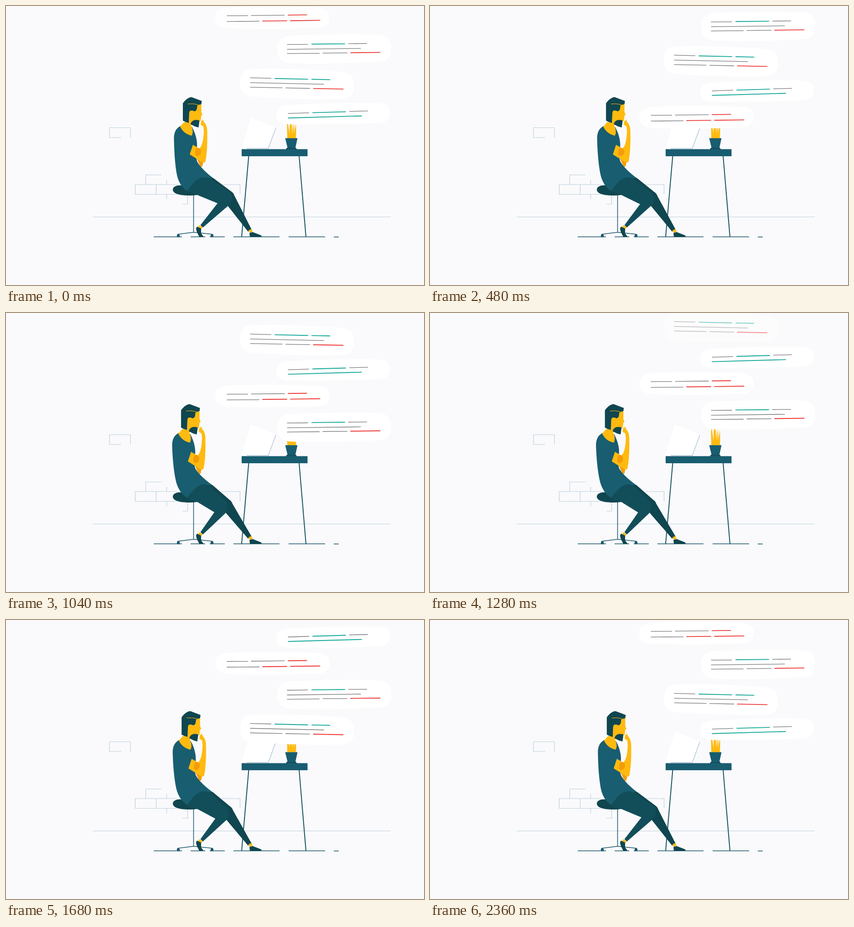
Animation of 917x611 px, one loop 2400 ms. Source, as an HTML page:

```html
<!DOCTYPE html>
<html lang="en">
<head>
<meta charset="utf-8">
<title>Thinking at the desk</title>
<style>
  html, body { margin: 0; width: 100%; height: 100%; overflow: hidden; background: #fafafc; }
  svg { display: block; width: 100%; height: 100%; }
  .wall, .floor, .ink { fill: none; }
  .wall { stroke: #bccfdb; stroke-width: 1.2; }
  .floor { stroke: #1a566a; stroke-width: 1.5; }
  .ink { stroke-linecap: round; }
  .shirt { fill: #195d70; }
  .dark { fill: #10464f; }
  .thigh { fill: #124e5a; }
  .skin { fill: #ffba10; }
  .shade { fill: #f39c0a; }
  .bubble { fill: #fff; }
  .grey { stroke: #77777b; stroke-width: 1.3; }
  .teal { stroke: #16a899; stroke-width: 1.9; }
  .red { stroke: #ec3a38; stroke-width: 1.9; }
</style>
</head>
<body>
<svg viewBox="0 0 917 611">
  <!-- room -->
  <path class="wall" d="M190 462H844M253 288H227V266.500H273V288M341 370H306.500V391M376 391H283.500V412.500H376M329.500 391V412M352.500 381V391M352.500 413V423M398.500 414V434H387M472 391H513.500V412"/>
  <path class="floor" d="M324 505.500H386M405 505.500H437M447 505.500H480M499 505.500H600M620 505.500H700M719 505.700H730"/>

  <!-- chair -->
  <path class="floor" d="M411.500 414V496M376 500L411.500 495.500L454 500"/>
  <g fill="#1a566a"><circle cx="378" cy="503.300" r="3.200"/><circle cx="452" cy="503.300" r="3.200"/></g>
  <path class="dark" d="M366 402C366 394 378 391 392 393L421 413.500C398 417 366 415 366 402Z"/>

  <!-- desk -->
  <path fill="#fff" d="M537 244L592 267L575 312H517Z"/>
  <path fill="none" stroke="#c3d3e0" stroke-width="2" d="M592 267L575.500 312H528"/>
  <path class="skin" d="M617 291L616.500 260L618 252L622 280L622.500 258L624 254L625 247L627 260L628 280L629.500 262L630.500 254L632 280L634 255L635 272L637 256L636 291Z"/>
  <path class="shirt" d="M612.500 289.500H639.500L635 310L638 314H614L617.500 310Z"/>
  <path fill="#154f60" d="M616 310.500H636L638 314H614Z"/>
  <path fill="none" stroke="#175363" stroke-width="2" d="M532.500 328L517 505M643 328L658 505"/>
  <path class="shirt" d="M517 313.500H661.500V329H517Z"/>

  <!-- person -->
  <path class="shade" id="elbow"/>
  <path class="shirt" id="shirt"/>
  <path class="dark" id="farLeg"/>
  <path class="thigh" id="nearLeg"/>
  <path class="skin" d="M423 480L431 484L429 488.500L422 485.500ZM532 491L538.500 488.500L541 494L535 497Z"/>
  <path class="dark" d="M419 483L428 487.500L428 498L433 504.500L431 506H424C422 500 417 494 417 487ZM534 497L541 495L559 502C562 504 561 506 557 506H535Z"/>
  <g id="top">
    <path class="skin" d="M402 229L410 226L419 215L428.500 213L428.500 232L431 238.500L428.500 240L427 252H412L406 262C411 272 410 279 407.500 284C397 282 387 275 382 264L391 254L401 255Z"/>
    <path class="dark" d="M388 213C393 206 400 200 407 199.500L429.500 208L428.500 215L420 217L418.500 226C416 232 412 231 410 229L404 229L402 233L401 256L394 254L388 251Z"/>
    <path fill="none" stroke="#ffba10" stroke-width="1" d="M399 214.500Q410 213 421 216"/>
    <path class="dark" d="M405 259C406 252 414 247 424.500 251L422.500 266L415 264Z"/>
    <path class="skin" d="M429.500 243L435 255C440 260 442 268 441.500 280C442 310 440 330 437 342L432 343L403 325L410 304L424 312C430 308 433 295 434 275L433 264L427 260L428 252L432 250Z"/>
    <path class="shade" d="M417 313C421 309 428 311 428 319C428 327 420 331 416 327C414 322 415 316 417 313Z"/>
  </g>

  <!-- messages -->
  <g class="msg">
    <path class="bubble" d="M485 3C540 0 640 1 684 3C701 4 710 12 709.500 25C709 42 700 47 684 48C610 51 540 51 488 49C470 48 459 40 459 27C459 12 468 5 485 3Z"/>
    <path class="ink grey" d="M485 21.500L530.500 21.300M538 21L611 20.200M485 34L555.500 33.500"/>
    <path class="ink red" d="M619 20L659.500 19.500M563 33L616 32.500M624 32.300L688.500 31.500"/>
  </g>
  <g class="msg">
    <path class="bubble" d="M621 65C690 62 770 61 818 63C836 64 845 75 845 92C845 111 838 121 820 122C750 126 680 128 622 125C603 123 595 112 595 95C595 77 603 67 621 65Z"/>
    <path class="ink grey" d="M617 84.500L662 84.200M751.500 82.700L791.500 82.300M617 95L778 93M617 104.300L687.500 103.700M695 103.200L748.500 102.800"/>
    <path class="ink teal" d="M671 83.600L743 83"/>
    <path class="ink red" d="M756 102.500L820.500 101.700"/>
  </g>
  <g class="msg">
    <path class="bubble" d="M540 138C600 136 680 139 737 144C756 146 764 157 763.500 174C763 194 755 203 737 203.500C670 205 600 203 538 198C521 196 513 185 514 167C515 148 522 139 540 138Z"/>
    <path class="ink grey" d="M536 157.300L581.500 158.500M536 168L697 171.500M536 178L606 179.300M613.500 179.500L666.500 180.600"/>
    <path class="ink teal" d="M590 158.800L662 160.500M671 160.600L710.500 161.500"/>
    <path class="ink red" d="M674.500 180.700L739.500 182"/>
  </g>
  <g class="msg">
    <path class="bubble" d="M620 217C690 213 770 211 817 213C834 214 843 221 842.500 235C842 249 834 255 817 256C750 259 680 260 619 259C602 258 593 251 593 239C593 225 602 218 620 217Z"/>
    <path class="ink grey" d="M619 235.500L664.500 234M753.500 231L793.500 230"/>
    <path class="ink teal" d="M673 233.700L745 231.700M619.500 245.300L780 240.800"/>
  </g>
</svg>
<script>
const LOOP = 2400, SPAN = 267.5;
const $ = id => document.getElementById(id);
const clamp = v => Math.max(0, Math.min(1, v));

// scroll distance over time, one leg per message
const SCROLL = [[0, 0], [611, 63], [1265, 136.3], [1790, 214.5], [LOOP, SPAN]];
// when each message has faded out, and when it starts to come back
const GONE = [115, 715, 1340, 1880];
const BACK = [240, 840, 1440, 2060];
const FADE = 115;
const msgs = document.querySelectorAll('.msg');

function scrolled(t) {
  const i = SCROLL.findIndex(([end]) => t < end);
  const [t0, y0] = SCROLL[i - 1], [t1, y1] = SCROLL[i];
  return y0 + (y1 - y0) * (t - t0) / (t1 - t0);
}

function drawMessages(t) {
  const y = scrolled(t);
  msgs.forEach((m, i) => {
    const left = t >= GONE[i];
    m.setAttribute('transform', `translate(0 ${(left ? SPAN : 0) - y})`);
    m.setAttribute('opacity', clamp((left ? t - BACK[i] : GONE[i] - t) / FADE));
  });
}

function drawPerson(lean) {
  // pt: a point and how far it travels at full lean
  const pt = (x, y, dx = 0, dy = 0) => `${x + dx * lean} ${y + dy * lean} `;
  const up = (x, y) => pt(x, y, -4.6);

  $('top').setAttribute('transform', `translate(${-4.6 * lean} 0)`);
  $('elbow').setAttribute('d', `M${up(418, 333)}L${up(433, 341)}L${up(431, 351)}L${up(427, 353)}Z`);
  $('shirt').setAttribute('d',
    `M${up(382, 263)}C${up(372, 269)}${up(368, 278)}${up(368.5, 292)}` +
    `C${pt(369, 320, -4.2)}${pt(371, 350, -3)}${pt(375, 370, -2)}` +
    `C${pt(378, 385, -1)}${pt(386, 398)}${pt(397, 405)}L${pt(425, 392)}L${pt(456, 378, -2)}` +
    `C${pt(441, 367, -3)}${pt(426, 353, -4)}${up(419, 340)}` +
    `C${up(415, 325)}${up(420, 315)}${up(419, 300)}C${up(418, 285)}${up(412, 272)}${up(408, 265)}Z`);
  $('farLeg').setAttribute('d',
    `M${pt(430, 377)}L${pt(455, 377, -2)}L${pt(494, 406, -5, 3)}` +
    `Q${pt(499, 409, -5, 3)}${pt(501, 415, -5, 3)}L${pt(538.5, 489)}L${pt(531, 494)}` +
    `L${pt(486, 437, -5, 0)}L${pt(455, 410, -4)}Z`);
  $('nearLeg').setAttribute('d',
    `M${pt(385, 401)}L${pt(397, 405)}C${pt(404, 396)}${pt(414, 381)}${pt(428, 376)}` +
    `C${pt(438, 374)}${pt(447, 376, -2)}${pt(456, 384, -5)}L${pt(490, 407, -12, 4)}` +
    `C${pt(500, 414, -13, 4)}${pt(496, 428, -11, 3)}${pt(488, 437, -8, 2)}` +
    `L${pt(432, 485)}L${pt(426.5, 480)}L${pt(464, 432, -8, 5)}L${pt(420, 414)}Z`);
}

function frame() {
  const t = performance.now() % LOOP;
  drawMessages(t);
  drawPerson(1 - Math.abs(1 - t / (LOOP / 2)));
  requestAnimationFrame(frame);
}
frame();
</script>
</body>
</html>
```
